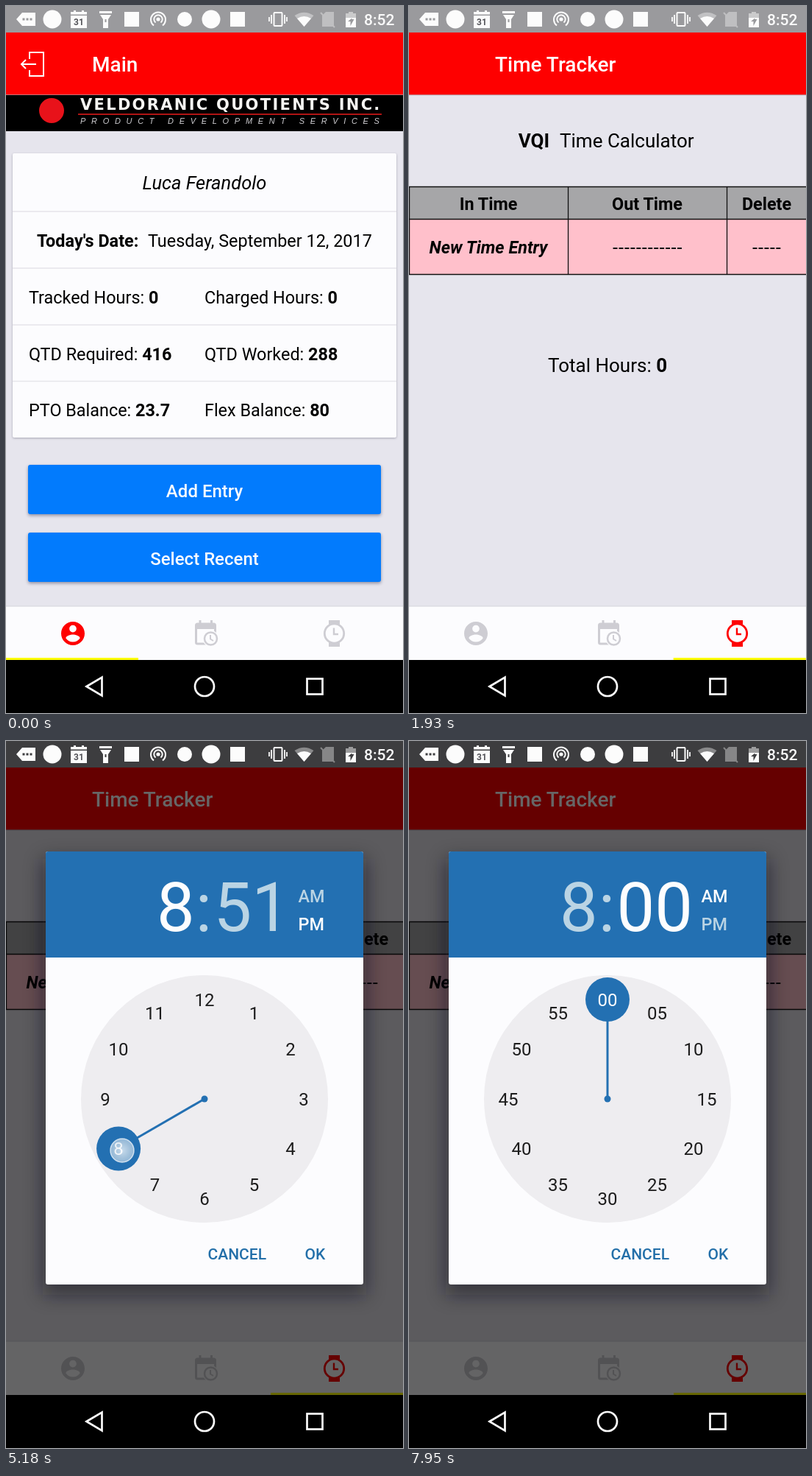
An HTML page that plays this animation: 540 by 960 pixels, repeating every 8 s.

```html
<!DOCTYPE html>
<html lang="en">
<head>
<meta charset="utf-8">
<title>Time Tracker</title>
<style>
html, body { margin: 0; width: 100%; height: 100%; overflow: hidden; background: #e6e5ed; }
svg { display: block; width: 100%; height: 100%; font-family: Roboto, sans-serif; font-size: 23.4px; }
.title { font-size: 28px; font-weight: 500; fill: #fff; }
.big { font-size: 26px; }
.mid { text-anchor: middle; }
.b { font-weight: 700; }
.i { font-style: italic; }
.m { font-weight: 500; }
.card { fill: #fcfcfe; filter: drop-shadow(0 1.5px 1.5px rgba(50, 50, 70, .35)); }
.btn { fill: #027bfd; filter: drop-shadow(0 2px 2px rgba(40, 40, 70, .45)); }
.btnText { font-size: 24px; font-weight: 500; fill: #fcfcfe; text-anchor: middle; }
.cut { fill: #9a9a9d; }
.line { fill: none; stroke-width: 2; }
.dial text { font-size: 24px; text-anchor: middle; }
</style>
</head>
<body>
<svg viewBox="0 0 540 960">
  <defs>
    <filter id="soft" x="-20%" y="-20%" width="140%" height="140%"><feGaussianBlur stdDeviation="13"/></filter>
    <radialGradient id="glow">
      <stop offset="0" stop-color="#fff" stop-opacity=".75"/>
      <stop offset=".75" stop-color="#e0e8ee" stop-opacity=".65"/>
      <stop offset="1" stop-color="#fff" stop-opacity=".5"/>
    </radialGradient>
  </defs>
  <rect width="540" height="960" fill="#e6e5ed"/>
  <rect y="36" width="540" height="84.500" fill="#fe0000"/>
  <rect y="120" width="540" height="1.500" fill="#606070" opacity=".25"/>

  <g id="page0">
    <path d="M32 72V63H51V95H32V87M41 79H21M27 73L21 79L27 85" class="line" stroke="#fff"/>
    <text x="117" y="89" class="title">Main</text>
    <rect y="121" width="540" height="49" fill="#000"/>
    <circle cx="62" cy="142" r="17" fill="#e8121a"/>
    <text x="101" y="141" font-family="DejaVu Sans, sans-serif" font-size="21" letter-spacing="2.300" class="b" fill="#f6f5f2">VELDORANIC QUOTIENTS INC.</text>
    <rect x="98" y="146" width="413" height="2" fill="#b01414"/>
    <text x="101" y="160" font-family="Liberation Sans, sans-serif" font-size="11" letter-spacing="7.700" class="i" fill="#cfced2">PRODUCT DEVELOPMENT SERVICES</text>
    <rect x="9" y="200" width="522" height="386" rx="2" class="card"/>
    <path d="M9 279H531M9 356H531M9 433H531M9 509.500H531" stroke="#e6e5ea" stroke-width="1.500"/>
    <text x="270" y="249" class="mid i" font-size="25.500">Luca Ferandolo</text>
    <text x="42" y="327" class="b">Today's Date:</text>
    <text x="193" y="327">Tuesday, September 12, 2017</text>
    <g id="stats"></g>
    <rect x="30" y="623" width="480" height="67" rx="3" class="btn"/>
    <rect x="30" y="715" width="480" height="67" rx="3" class="btn"/>
    <text x="270" y="667" class="btnText">Add Entry</text>
    <text x="270" y="759" class="btnText">Select Recent</text>
  </g>

  <g id="page1">
    <text x="117" y="89" class="title">Charges</text>
    <text x="270" y="192" class="mid big"><tspan class="b">Charges for Today:</tspan> Tuesday, September 12,</text>
    <text x="270" y="223" class="mid big">2017</text>
    <text x="270" y="525" class="mid big b">You have no charges for today!</text>
  </g>

  <g id="page2">
    <text x="117" y="89" class="title">Time Tracker</text>
    <text x="191" y="192" class="big b" text-anchor="end">VQI</text>
    <text x="205" y="192" class="big">Time Calculator</text>
    <rect y="246" width="540" height="44" fill="#a6a6a8"/>
    <rect y="290" width="540" height="74" fill="#ffc0cb"/>
    <path d="M0 245.500H540M0 289.500H540M0 364.500H540M.5 245V365M216.500 245V365M432.500 245V365" stroke="#111" stroke-width="1.300"/>
    <g class="mid b">
      <text x="108" y="277">In Time</text>
      <text x="324" y="277">Out Time</text>
      <text x="486.500" y="277">Delete</text>
      <text x="108" y="336" class="i">New Time Entry</text>
    </g>
    <path d="M277.500 329H372M467.500 329H506" stroke="#111" stroke-width="2.200" stroke-dasharray="6 1.950"/>
    <text x="270" y="497" class="mid big">Total Hours: <tspan class="b">0</tspan></text>
  </g>

  <rect width="540" height="36" class="cut"/>

  <g id="tabs">
    <rect y="815" width="540" height="73" fill="#fcfcfe"/>
    <rect y="814.500" width="540" height="1" fill="#d6d5dc"/>
    <rect id="marker" y="885" width="180" height="3" fill="#ffff00"/>
    <g id="tab0" transform="translate(71.800 832.800) scale(1.600)" fill="currentColor">
      <path d="M12 2C6.500 2 2 6.500 2 12s4.500 10 10 10 10-4.500 10-10S17.500 2 12 2zm0 3c1.700 0 3 1.300 3 3s-1.300 3-3 3-3-1.300-3-3 1.300-3 3-3zm0 14.200c-2.500 0-4.700-1.300-6-3.200 0-2 4-3.100 6-3.100s6 1.100 6 3.100c-1.300 1.900-3.500 3.200-6 3.200z"/>
    </g>
    <g id="tab1" fill="none" stroke="currentColor" stroke-width="3">
      <rect x="258.500" y="839" width="26" height="27" rx="2"/>
      <path d="M258 842.500H285" stroke-width="7"/>
      <path d="M264 834V840M279.500 834V840"/>
      <circle cx="278.500" cy="859" r="11" fill="#fcfcfe" stroke="none"/>
      <circle cx="278.500" cy="859" r="8.500" stroke-width="2.500"/>
      <path d="M278 854V859.500L282 862" stroke-width="2"/>
    </g>
    <g id="tab2" fill="none" stroke="currentColor" stroke-width="2.800">
      <circle cx="446.500" cy="852" r="13.200"/>
      <path d="M446 844.500V853H452" stroke-width="2.400"/>
      <path d="M439 834H454V840Q446.500 836.500 439 840ZM439 870H454V864Q446.500 867.500 439 864Z" fill="currentColor" stroke="none"/>
    </g>
  </g>

  <rect id="dim" width="540" height="888"/>

  <g fill="#fcfcfc" stroke="#fcfcfc" stroke-width="0">
    <path fill-rule="evenodd" d="M14 18L22 9H40V27H22ZM22.500 16.500v3h3v-3zM27.500 16.500v3h3v-3zM32.500 16.500v3h3v-3z"/>
    <circle cx="63" cy="18" r="12.500"/>
    <path fill-rule="evenodd" d="M88 8H92V6H95V8H103V6H106V8H110V30H88ZM88 11.500V13H110V11.500Z"/>
    <text x="99" y="26" class="mid b" font-size="12" fill="#55555a">31</text>
    <path fill-rule="evenodd" d="M127 7H144V10H127ZM128 12H143L139 18V30H132V18ZM134.500 18V22H136.500V18Z"/>
    <rect x="161" y="8" width="20" height="20"/>
    <path d="M201 26.500A10 10 0 1 1 213 26.500M203.500 22.500A5.700 5.700 0 1 1 210.500 22.500" class="line"/>
    <circle cx="207" cy="18" r="2.600"/>
    <circle cx="243" cy="18" r="10"/>
    <circle cx="279" cy="18" r="12.500"/>
    <rect x="305" y="8" width="20" height="20"/>
    <rect x="364.500" y="9" width="11" height="18" rx="1" class="line"/>
    <path d="M361 12V24M358 15V21M379 12V24M382 15V21" stroke-width="1.800"/>
    <path d="M392.500 13Q405.500 4.500 418.500 13L405.500 28Z" opacity=".4"/>
    <path d="M396 17Q405.500 11 415 17L405.500 28Z"/>
    <g opacity=".38"><path d="M430 13L435 8H446V28H430Z"/><path d="M428 9L447 29" stroke-width="2"/></g>
    <path d="M462 10H466V8H472V10H476V17H462Z" opacity=".5"/>
    <path fill-rule="evenodd" d="M462 16H476V29H462ZM470.500 16.500L465 21H468.500V27L473.500 18H470.500Z"/>
    <text x="487" y="26" class="m" font-size="21">8:52</text>
  </g>

  <rect y="888" width="540" height="72" fill="#000"/>
  <g fill="none" stroke="#fcfcfc" stroke-width="2.700">
    <path d="M109.500 924L130.500 911.500V936.500Z"/>
    <circle cx="270" cy="924" r="13"/>
    <rect x="409.500" y="913.500" width="21" height="21"/>
  </g>

  <g id="dialog">
    <rect x="50" y="160" width="440" height="592" fill="#0c0a1c" opacity=".5" filter="url(#soft)"/>
    <rect x="54" y="150" width="432" height="588" rx="3" fill="#fcfcfe"/>
    <path d="M54 294V153Q54 150 57 150H483Q486 150 486 153V294Z" fill="#2370b2"/>
    <g font-size="92">
      <text id="hour" x="205" y="258">8</text>
      <text x="269" y="258" class="mid" fill="#bad4e4">:</text>
      <text id="minute" x="282.500" y="258"></text>
    </g>
    <text id="am" x="397.500" y="219" class="m">AM</text>
    <text id="pm" x="397.500" y="257" class="m">PM</text>
    <circle cx="270" cy="486" r="168" fill="#eeedf0"/>
    <g id="dials"></g>
    <circle cx="270" cy="486" r="4.500" fill="#2370b2"/>
    <g class="m" font-size="21" fill="#236fa9">
      <text x="274.500" y="704">CANCEL</text>
      <text x="406.500" y="704">OK</text>
    </g>
  </g>
  <circle id="touch" r="16" fill="url(#glow)" stroke="#fff" stroke-opacity=".7" stroke-width="1.500"/>
</svg>
<script>
const LOOP = 8000;
const $ = id => document.getElementById(id);
const set = (id, attrs) => { for (const k in attrs) $(id).setAttribute(k, attrs[k]); };
const ramp = (t, from, length) => Math.min(1, Math.max(0, (t - from) / length));
const smooth = p => .5 - .5 * Math.cos(Math.PI * p);
const mix = (a, b, p) => `rgb(${a.map((v, i) => Math.round(v + (b[i] - v) * p))})`;

const RED = [254, 0, 0], PINK = [224, 146, 150], GRAY = [206, 205, 211];
const ON = '#fdfdfe', OFF = '#bad4e4', BLUE = '#2370b2';

// start, end, x, y of each finger press
const TAPS = [
  [1140, 1330, 446, 852],
  [2770, 3130, 139, 330],
  [5180, 5340, 158, 556],
  [6380, 6690, 270, 352],
  [7530, 7890, 415, 211]
];

const STATS = [
  ['Tracked Hours', 0, 'Charged Hours', 0],
  ['QTD Required', 416, 'QTD Worked', 288],
  ['PTO Balance', 23.7, 'Flex Balance', 80]
];
const stat = (x, y, name, value) =>
  `<text x="${x}" y="${y}">${name}: <tspan class="b">${value}</tspan></text>`;
$('stats').innerHTML = STATS.map(([a, av, b, bv], i) => {
  const y = 404 + i * 76.700;
  return stat(31, y, a, av) + stat(270, y, b, bv);
}).join('');

// Point on the clock face; turn runs from 0 to 1 clockwise from the top.
const onFace = (turn, r) => [
  270 + r * Math.sin(turn * 2 * Math.PI),
  486 - r * Math.cos(turn * 2 * Math.PI)
];

function dial(id, label) {
  let labels = '';
  for (let i = 0; i < 12; i++) {
    const [x, y] = onFace(i / 12, 135);
    labels += `<text x="${x}" y="${y + 8.500}">${label(i)}</text>`;
  }
  return `<g id="${id}" class="dial">
    <clipPath id="${id}Clip"><circle id="${id}Hole" r="30"/></clipPath>
    <g fill="#1d1d1d">${labels}</g>
    <line id="${id}Hand" x1="270" y1="486" stroke="${BLUE}" stroke-width="3"/>
    <circle id="${id}Knob" r="30" fill="${BLUE}"/>
    <g fill="#fcfcfe" clip-path="url(#${id}Clip)">${labels}</g>
    <circle id="${id}Dot" r="3" fill="#fcfcfe"/>
  </g>`;
}
$('dials').innerHTML = dial('hours', i => i || 12) +
  dial('minutes', i => String(i * 5).padStart(2, '0'));

function aim(id, turn, opacity) {
  const [cx, cy] = onFace(turn, 135), [x2, y2] = onFace(turn, 106);
  set(id, { opacity });
  set(id + 'Hand', { x2, y2 });
  for (const part of ['Hole', 'Knob', 'Dot']) set(id + part, { cx, cy });
  const between = Math.abs(turn * 12 - Math.round(turn * 12)) > .01;
  set(id + 'Dot', { opacity: between ? 1 : 0 });
}

const slide = t => 2 * (1 - (1 - ramp(t, 1407, 600)) ** 5);

function tabColor(active) {
  return active > .5 ? mix(PINK, RED, active * 2 - 1) : mix(GRAY, PINK, active * 2);
}

function draw(t) {
  // pages and tabs; the tab bar trails the pages slightly
  const pos = slide(t), tabPos = slide(t - 71);
  for (let i = 0; i < 3; i++) {
    set('page' + i, { transform: `translate(${(i - pos) * 540} 0)` });
    $('tab' + i).style.color = tabColor(Math.max(0, 1 - Math.abs(i - tabPos)));
  }
  set('marker', { x: tabPos * 180 });

  // dialog opening
  set('dim', { opacity: ramp(t, 3072, 150) * .6 });
  set('dialog', { opacity: ramp(t, 3025, 150) });

  // picking the time
  const toMinutes = t >= 5325;
  const minute = t < 6410 ? 51 : 0;
  const isAm = t >= 7690;
  const fadeOut = smooth(ramp(t, 5325, 500));
  const fadeIn = Math.max(0, (smooth(ramp(t, 5325, 625)) - .2) / .8);
  aim('hours', 8 / 12, 1 - fadeOut);
  aim('minutes', minute / 60, fadeIn);
  set('hour', { fill: toMinutes ? OFF : ON });
  set('minute', { fill: toMinutes ? ON : OFF });
  $('minute').textContent = String(minute).padStart(2, '0');
  set('am', { fill: isAm ? ON : OFF });
  set('pm', { fill: isAm ? OFF : ON });

  const tap = TAPS.find(([from, to]) => t >= from && t < to);
  set('touch', tap
    ? { cx: tap[2], cy: tap[3], opacity: Math.min(1, (tap[1] - t) / 90) }
    : { opacity: 0 });
}

function tick() {
  draw(performance.now() % LOOP);
  requestAnimationFrame(tick);
}
tick();
</script>
</body>
</html>
```
